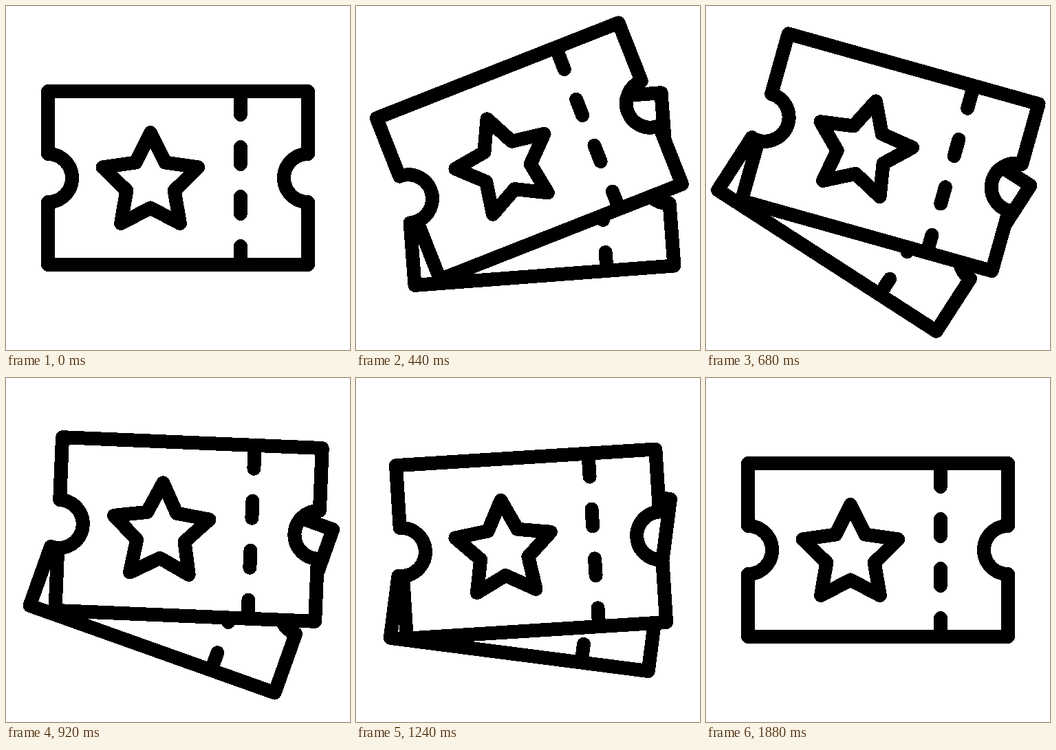
An HTML page that plays this animation: 500 px wide and 500 px high, repeating every 2000 ms.

```html
<!DOCTYPE html>
<html lang="en">
<head>
<meta charset="utf-8">
<title>Tickets</title>
<style>
  html, body { margin: 0; width: 100%; height: 100%; overflow: hidden; background: #fff; }
  svg { display: block; width: 100vw; height: 100vh; }
</style>
</head>
<body>
<svg viewBox="0 0 500 500" shape-rendering="crispEdges">
  <defs>
    <!-- Ticket centred on the origin -->
    <g id="ticket" fill="#fff" stroke="#000" stroke-width="20" stroke-linecap="round" stroke-linejoin="round">
      <path d="M-189-126H189V-35A35 35 0 0 0 189 35V126H-189V35A35 35 0 0 0-189-35Z"/>
      <path d="M91-126v34M91-45v25M91 27v25M91 99v27"/>
      <path id="star"/>
    </g>
  </defs>
  <use id="back" href="#ticket"/>
  <use id="front" href="#ticket"/>
</svg>
<script>
const LOOP = 2000, STEP = 40, LAST = 1880;
const HALF = 189, CENTER = 250;

// Sine ease: 0 before `from`, 1 after `to`
function ease(t, from, to) {
  const p = Math.min(Math.max((t - from) / (to - from), 0), 1);
  return (1 - Math.cos(Math.PI * p)) / 2;
}

function pose(t) {
  const lift = ease(t, 0, 440);
  return {
    fan: 17.2 * (ease(t, 0, 360) - ease(t, 1120, 1410)),
    swing: -12.9 * lift + 39.1 * ease(t, 440, 720) - 25.9 * ease(t, 720, 1080)
      + 3.8 * ease(t, 1080, 1440) - 4.1 * ease(t, 1440, LAST),
    x: CENTER + 8.2 * lift - 2.2 * ease(t, 440, 680) + 4.2 * ease(t, 680, 920)
      - 10.2 * ease(t, 920, 1480),
    y: CENTER - 11.5 * lift + 21.5 * ease(t, 720, 1160) - 10 * ease(t, 1180, 1480)
  };
}

function starPath(cx, cy, outer, inner) {
  const points = Array.from({ length: 10 }, (_, i) => {
    const r = i % 2 ? inner : outer, a = i * Math.PI / 5;
    return `${cx + r * Math.sin(a)} ${cy - r * Math.cos(a)}`;
  });
  return `M${points.join("L")}Z`;
}

const el = id => document.getElementById(id);
el("star").setAttribute("d", starPath(-40, 7, 73, 36.5));
const front = el("front"), back = el("back");

// The tickets fan out around the middle of their left edge
function place(node, side, { x, y, swing, fan }) {
  const tilt = side * fan / 2;
  const shift = HALF * Math.sin(tilt * Math.PI / 180);
  node.setAttribute("transform",
    `translate(${x} ${y}) rotate(${swing}) translate(0 ${shift}) rotate(${tilt})`);
}

function draw(time) {
  const now = pose(Math.min(Math.floor(time / STEP) * STEP, LAST));
  place(back, 1, now);
  place(front, -1, now);
}

const start = performance.now();
function tick() {
  draw((performance.now() - start) % LOOP);
  requestAnimationFrame(tick);
}
tick();
</script>
</body>
</html>
```
